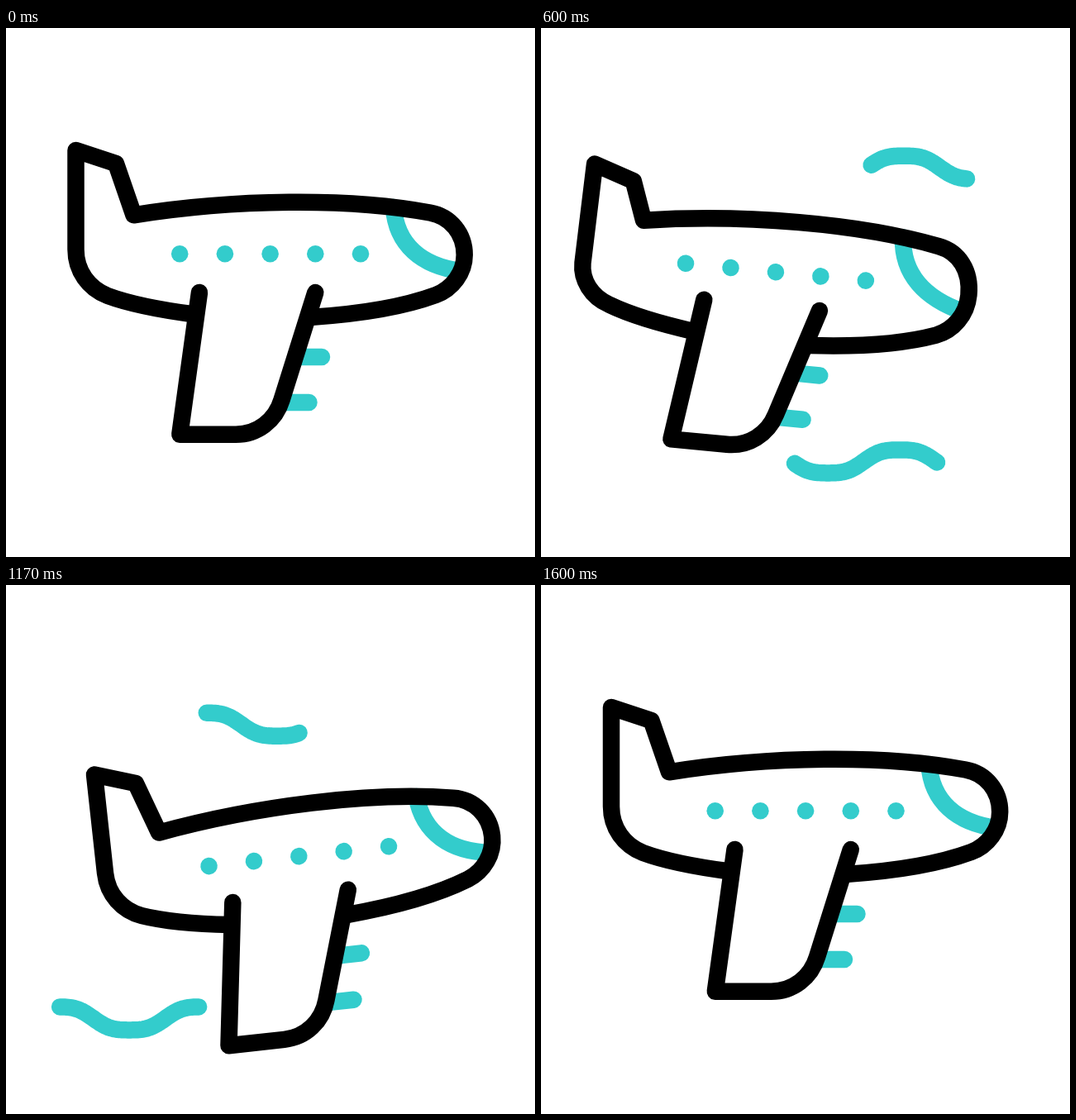
An HTML page with a canvas that plays this animation: 640x640 px, repeating every 1.67 s.

```html
<!DOCTYPE html>
<html>
<head>
<meta charset="utf-8">
<style>
  html, body { margin: 0; width: 640px; height: 640px; overflow: hidden; background: #fff; }
  canvas { display: block; }
</style>
</head>
<body>
<canvas id="stage" width="640" height="640"></canvas>
<script>
const ctx = document.getElementById('stage').getContext('2d');
const TEAL = '#33cccc', BLACK = '#000', LOOP = 1670;

// step, x, y, tilt in degrees, roll, wave heads, upper wave tail, lower wave tail
const KEYS = [
  [0, 0, 0, 0, 0, 0, 0, 0],
  [5, -16.4, 4, 2.05, .36, .046, 0, 0],
  [13, -44, 13.8, 5.87, 1, .303, .008, .005],
  [17, -43, 20, 5.8, 1.1, .455, .04, .07],
  [23, -12.9, 32.7, 2.02, 1, .672, .152, .237],
  [29, 28.7, 50.7, -4.45, .4, .896, .377, .43],
  [33.5, 40, 57.5, -6.2, .06, .985, .525, .565],
  [40, 28.5, 32.8, -4.9, 0, 1, .729, .749],
  [48, .5, 0, 0, 0, 1, 1, 1]
];

function slope(i, c) {
  if (i === 0 || i === KEYS.length - 1) return 0;
  const [a, b, d] = [KEYS[i - 1], KEYS[i], KEYS[i + 1]];
  const h0 = b[0] - a[0], h1 = d[0] - b[0];
  return ((b[c] - a[c]) / h0 * h1 + (d[c] - b[c]) / h1 * h0) / (h0 + h1);
}

// Smooth cubic through the keys of one column
function track(c, n) {
  let i = 0;
  while (i < KEYS.length - 2 && n >= KEYS[i + 1][0]) i++;
  const a = KEYS[i], b = KEYS[i + 1], h = b[0] - a[0];
  const s = (n - a[0]) / h, r = 1 - s;
  return r * r * (1 + 2 * s) * a[c] + s * s * (3 - 2 * s) * b[c]
    + h * s * r * (r * slope(i, c) - s * slope(i + 1, c));
}

function stroke(path, color, fill) {
  const p = new Path2D(path);
  if (fill) { ctx.fillStyle = fill; ctx.fill(p); }
  ctx.strokeStyle = color;
  ctx.stroke(p);
}

function wave(start, length, trough, midY, head, tail, drift) {
  const from = start - length * head, to = start - length * tail;
  if (to - from < 1) return;
  ctx.strokeStyle = TEAL;
  ctx.beginPath();
  for (let u = from; u < to + 2; u += 2) {
    const x = Math.min(u, to), a = (x - trough) * Math.PI / 87;
    ctx.lineTo(x - drift, midY + 14 * (1.1 * Math.cos(a) - .1 * Math.cos(3 * a)));
  }
  ctx.stroke();
}

function plane(x, y, tilt, roll) {
  const m = roll;
  ctx.save();
  ctx.translate(320 + x, 320 + y);
  ctx.rotate(tilt * Math.PI / 180);
  ctx.translate(-320, -320);

  stroke(`M469 217C472 262 503 288 550 ${294 + 5 * m}`, TEAL);
  ctx.fillStyle = TEAL;
  for (let i = 0; i < 5; i++) {
    ctx.beginPath();
    ctx.arc(210.2 + 54.7 * i, 273.2, 10.3, 0, 7);
    ctx.fill();
  }

  ctx.lineCap = 'butt';
  const left = 84.5 + 1.5 * m;
  stroke(`M228 ${346.5 + 7 * m}C186 ${341 + 7 * m} 150 ${334 + 7 * m} 123 ${324 + 7 * m}
    C100 ${315 + 8 * m} ${left} ${294 + 10 * m} ${left} ${268 + 15 * m}
    L${84.5 + 4.3 * m} ${148 + 14.5 * m}L${133 + 4.3 * m} ${164 + 14.5 * m}
    L154.5 226.3C275 207 415 205 513 223.5
    C538 228 554.7 249 554.7 ${274.5 + 4 * m}
    C554.7 ${296 + 6 * m} 540 ${315.5 + 7 * m} 520 ${323 + 7 * m}
    C482 ${337 + 7 * m} 430 ${346 + 7 * m} 368 ${350 + 7 * m}`, BLACK);
  ctx.lineCap = 'round';

  ctx.translate(2.3 * m, -4.7 * m);
  stroke('M350 398H382M335 453H366.5', TEAL);
  stroke('M234 320L210.3 491.7H278C304 491.7 326 475 333.5 450L374.3 320', BLACK, '#fff');
  ctx.restore();
}

function draw(now) {
  const n = Math.min(48, Math.floor((now % LOOP) * .03 + .11));
  const [x, y, tilt, roll, head, tailTop, tailLow] = [1, 2, 3, 4, 5, 6, 7].map(c => track(c, n));
  const drift = 1.4 * (n - 13);
  ctx.fillStyle = '#fff';
  ctx.fillRect(0, 0, 640, 640);
  ctx.lineWidth = 20.5;
  ctx.lineCap = ctx.lineJoin = 'round';
  wave(536, 263, 533, 168.7, head, tailTop, drift);
  wave(526, 431, 528, 524.4, head, tailLow, drift);
  plane(x, y, tilt, roll);
}

const begin = performance.now();
function tick() {
  draw(performance.now() - begin);
  requestAnimationFrame(tick);
}
tick();
</script>
</body>
</html>
```
